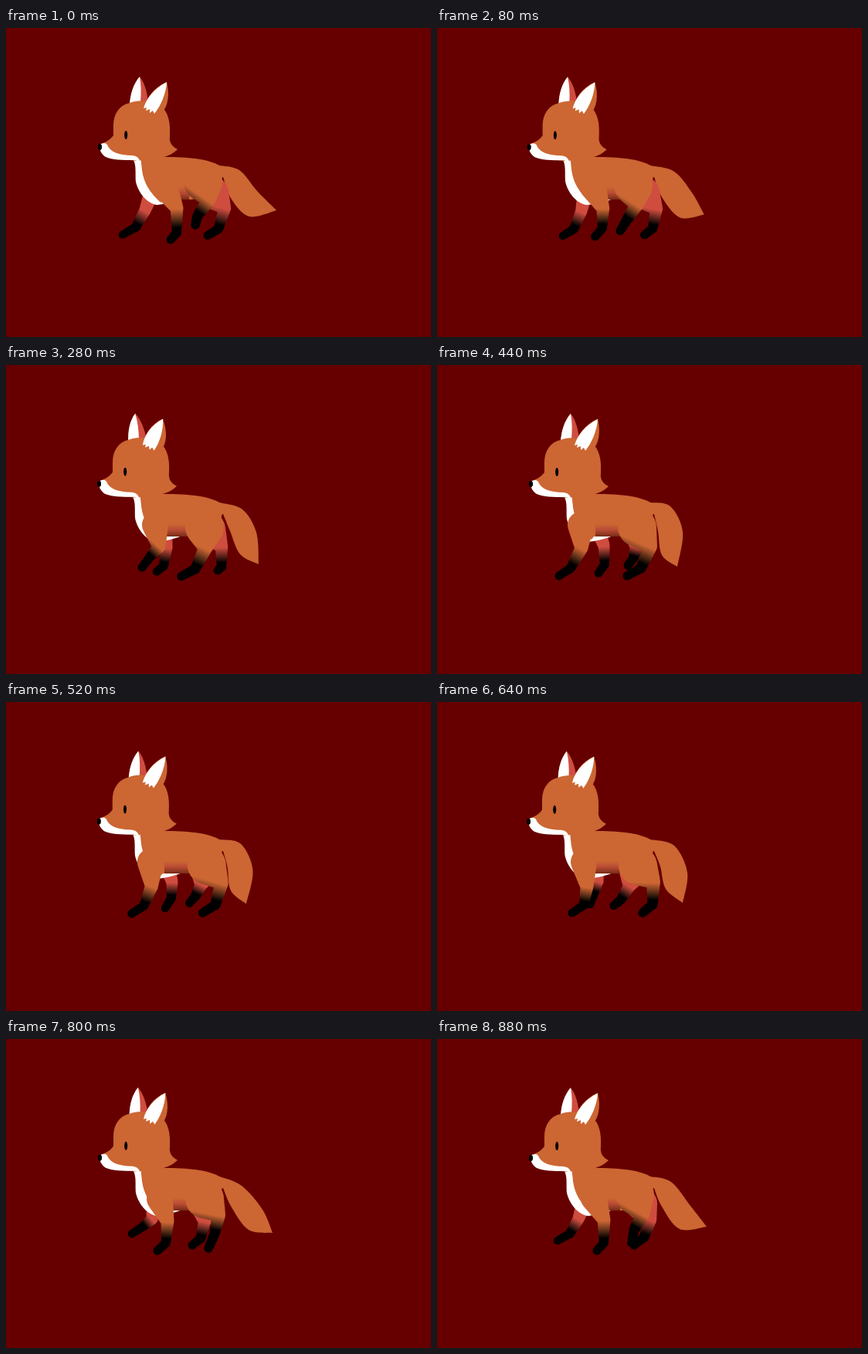
Write an HTML page with a canvas that moves like this. It is 550 px wide and 400 px high and loops after 0.92 s.

```html
<!DOCTYPE html>
<html lang="en">
<head>
<meta charset="utf-8">
<title>Walking fox</title>
<style>
html, body { margin: 0; width: 100%; height: 100%; overflow: hidden; background: #600; }
canvas { display: block; width: 550px; height: 400px; }
</style>
</head>
<body>
<canvas id="stage" width="550" height="400"></canvas>
<script>
const ctx = document.getElementById('stage').getContext('2d');
const LOOP = 920, STEP = 40;
const FUR = '#cc6633', SHADE = '#cf4d3f', WHITE = '#fff', BLACK = '#000';

// Legs: time, then x,y of hip, knee, ankle and toe
const nearFront = { fur: FUR, r: [17, 8.5, 6, 5.6], keys: [
  [0, 205,205, 221,233, 221,265, 213,274],
  [60, 203,206, 217,233, 217,260, 208,271],
  [160, 199,207, 205,234, 200,256, 190,266],
  [280, 193,207, 198,235, 186,249, 176,262],
  [350, 189,207, 192,235, 179,252, 166,264],
  [440, 186,207, 187,237, 173,263, 158,273],
  [640, 190,207, 194,239, 190,263, 175,273],
  [800, 199,207, 209,236, 207,264, 196,274],
  [880, 203,206, 216,234, 216,264, 207,274]
]};
const nearHind = { fur: FUR, r: [25, 9, 6.6, 5.8], keys: [
  [0, 255,199, 262,223, 248,243, 245,255],
  [160, 254,209, 256,235, 244,257, 231,271],
  [280, 257,210, 258,237, 245,264, 227,273.5],
  [440, 259,210, 276,235, 264,263, 246,273],
  [640, 260,212, 280,233, 279,262, 266,273],
  [720, 259,211, 281,231, 279,259, 270,272.5],
  [800, 257,207, 275,228, 270,252, 262,271],
  [880, 256,202, 266,227, 255,247, 252,264]
]};
const farFront = { fur: SHADE, r: [10, 7.6, 6, 5.3], keys: [
  [0, 188,214, 180,236, 168,258, 151,267.5],
  [160, 196,214, 195,238, 188,261, 177,269],
  [280, 205,214, 208,236, 204,260, 195,267.5],
  [440, 209,214, 216,234, 217,258, 209,269.5],
  [520, 209,214, 215,233, 214,254, 206,267],
  [640, 206,214, 208,232, 203,248, 198,262],
  [800, 192,212, 189,233, 177,243, 163,252],
  [880, 190,213, 183,233, 172,252, 156,261]
]};
const farHind = { fur: SHADE, r: [21, 8.2, 6.2, 5.5], keys: [
  [0, 267,213, 283,233, 275,260, 261,268.5],
  [160, 266,213, 283,235, 281,259, 274,267],
  [280, 263,212, 279,235, 279,261, 274,266],
  [440, 261,212, 258,235, 254,250, 247,259.5],
  [640, 256,215, 249,238, 238,256, 229,263.5],
  [800, 259,213, 257,236, 252,258, 241,267],
  [880, 264,213, 276,234, 268,257, 255,267]
]};
// Tail: two upper points, tip, two lower points
const tailKeys = [
  [0, 302,184, 325,211, 350,236, 315,244, 292,222],
  [160, 310,187, 333,215, 340,249, 313,247, 291,217],
  [280, 306,187, 324,217, 327,258, 303,245, 290,215],
  [440, 302,183, 318,216, 311,261, 291,246, 286,215],
  [640, 307,186, 324,221, 318,260, 296,242, 289,213],
  [800, 305,190, 332,221, 345,251, 314,247, 292,218],
  [880, 303,185, 328,216, 349,243, 314,246, 291,217]
];
// Head: x, y and lean of the ears
const headKeys = [
  [0, 0, 0, 0], [160, -4, .5, -3], [280, -1, -.3, -4.5], [440, 0, 0, 0],
  [640, -3, .8, -2], [800, 0, -.2, -2], [880, 0, 0, 0]
];

const path = d => new Path2D(d);
const farEar = path('M173 63C165 72 161 85 160 99L184 99C183 84 180 72 173 63Z');
const farEarIn = path('M173 63C165 72 161 85 160 98L174 96C175 85 175 74 173 63Z');
const nearEar = path('M208 70C192 76 182 90 178 104L190 115L204 107C211 97 211 82 208 70Z');
const nearEarIn = path('M208 70C192 78 181 92 178 104L182 103L181 107L186 105L186 110L190 107L192 111C200 101 207 86 208 70Z');
const skull = path('M160 97C146 100 139 112 139 126L139 139C135 145 128 148 121 151C121 160 128 168 140 169L170 172L200 168C210 166 217 162 222 157C214 153 211 147 212 140C213 122 210 108 200 101C188 94 172 92 160 97Z');
const muzzle = path('M121 151Q128 147 131 151C134 160 146 165 164 165C170 166 172 168 174 174L167 171C150 171 138 171 129 167C123 163 121 158 121 151Z');

// Smooth periodic interpolation through timed rows
function sample(keys, t) {
  const n = keys.length;
  const row = i => keys[(i + n) % n];
  const time = i => row(i)[0] + Math.floor(i / n) * LOOP;
  let i = n - 1;
  while (keys[i][0] > t) i--;
  const span = time(i + 1) - time(i), u = (t - time(i)) / span;
  return row(i).slice(1).map((a, k) => {
    const v = j => row(j)[k + 1], b = v(i + 1);
    const slope = j => (v(j + 1) - v(j - 1)) / (time(j + 1) - time(j - 1)) * span;
    const m0 = slope(i), m1 = slope(i + 1);
    return a + u * (m0 + u * (3 * (b - a) - 2 * m0 - m1 + u * (2 * (a - b) + m0 + m1)));
  });
}

const pairs = v => Array.from({ length: v.length / 2 }, (_, i) => [v[2 * i], v[2 * i + 1]]);
const mix = (a, b, u) => a + (b - a) * u;

function fill(shape, color) {
  ctx.fillStyle = color;
  ctx.fill(shape);
}

function oval(x, y, rx, ry, color) {
  const p = new Path2D();
  p.ellipse(x, y, rx, ry, 0, 0, 7);
  fill(p, color);
}

function drawLeg({ fur, r, keys }, t) {
  const j = pairs(sample(keys, t)), p = new Path2D(), N = 40;
  for (let s = 0; s < 3; s++) {
    for (let i = 0; i <= N; i++) {
      const u = i / N, rad = mix(r[s], r[s + 1], u);
      const x = mix(j[s][0], j[s + 1][0], u), y = mix(j[s][1], j[s + 1][1], u);
      p.moveTo(x + rad, y);
      p.arc(x, y, rad, 0, 2 * Math.PI);
    }
  }
  const g = ctx.createLinearGradient(...j[1], ...j[2]);
  g.addColorStop(.05, fur);
  g.addColorStop(.8, BLACK);
  fill(p, g);
}

function curve(p, pts) {
  for (let i = 0; i < pts.length - 1; i++) {
    const a = pts[i], b = pts[i + 1], q = pts[i - 1] || a, s = pts[i + 2] || b;
    p.bezierCurveTo(a[0] + (b[0] - q[0]) / 6, a[1] + (b[1] - q[1]) / 6,
      b[0] - (s[0] - a[0]) / 6, b[1] - (s[1] - a[1]) / 6, ...b);
  }
}

function drawTail(t) {
  const [a, b, tip, c, d] = pairs(sample(tailKeys, t));
  const root = [276, 178], p = new Path2D();
  p.moveTo(...root);
  curve(p, [root, a, b, tip]);
  curve(p, [tip, c, d, [281, 193]]);
  p.lineTo(268, 195);
  fill(p, FUR);
}

function drawTorso(dx) {
  const x = v => v + dx;
  fill(path(`M${x(160)} 166C${x(170)} 172 ${x(167)} 185 ${x(168)} 199C${x(171)} 213 ${x(183)} 228 ${x(196)} 229C205 228 215 226 228 221L235 200L180 165Z`), WHITE);
  fill(path(`M${x(174)} 165L${x(205)} 167C235 167 262 169 278 179C283 184 281 200 268 216L240 222L203 222L${x(200)} 226C${x(186)} 213 ${x(178)} 200 ${x(176)} 184Z`), FUR);
  const g = ctx.createLinearGradient(0, 206, 0, 223);
  g.addColorStop(0, FUR);
  g.addColorStop(.45, '#b84a35');
  g.addColorStop(1, '#702812');
  ctx.fillStyle = g;
  ctx.fillRect(205, 206, 32, 16);
}

function drawHead([dx, dy, lean]) {
  ctx.save();
  ctx.translate(dx, dy);
  ctx.save();
  ctx.transform(1, 0, -lean / 40, 1, lean * 105 / 40, 0);
  fill(farEar, SHADE);
  fill(farEarIn, WHITE);
  ctx.restore();
  fill(skull, FUR);
  ctx.save();
  ctx.transform(1, 0, -lean / 40, 1, lean * 105 / 40, 0);
  fill(nearEar, FUR);
  fill(nearEarIn, WHITE);
  ctx.restore();
  fill(muzzle, WHITE);
  oval(121.5, 154, 2.6, 4, BLACK);
  oval(155.2, 138.5, 2, 5.5, BLACK);
  ctx.restore();
}

function draw(now) {
  const t = Math.floor(now % LOOP / STEP) * STEP;
  const head = sample(headKeys, t);
  ctx.fillStyle = '#660000';
  ctx.fillRect(0, 0, 550, 400);
  drawTail(t);
  drawLeg(farHind, t);
  drawLeg(farFront, t);
  drawTorso(head[0] * .8);
  drawLeg(nearHind, t);
  drawLeg(nearFront, t);
  drawHead(head);
}

const start = performance.now();
function tick() {
  draw(performance.now() - start);
  requestAnimationFrame(tick);
}
tick();
</script>
</body>
</html>
```
